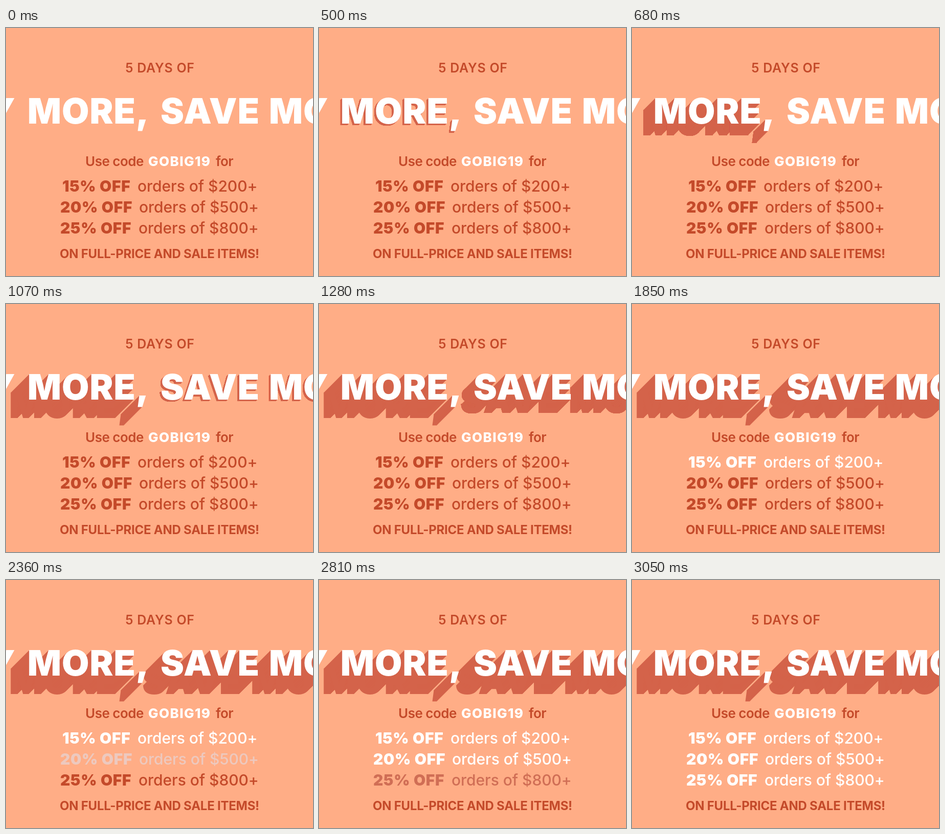
An HTML page that plays this animation: 600x485 px, repeating every 4.2 s.

```html
<!DOCTYPE html>
<html lang="en">
<head>
<meta charset="utf-8">
<style>
  html, body { margin: 0; height: 100%; overflow: hidden; background: #ffad86; }
  svg { display: block; font-family: Inter, Roboto, sans-serif; fill: #c44a2a; }
  .head { font-size: 69px; font-weight: 900; letter-spacing: 1px; fill: #fff; }
  .shade { fill: #d4634a; }
  .top { font-size: 25px; font-weight: 600; letter-spacing: .7px; }
  .use { font-size: 26px; font-weight: 600; letter-spacing: -.5px; }
  .code { font-weight: 800; fill: #fff; letter-spacing: 1.4px; }
  .offer { font-size: 30px; font-weight: 500; letter-spacing: -.05px; }
  .off { font-weight: 900; letter-spacing: .7px; }
  .foot { font-size: 24px; font-weight: 700; letter-spacing: -.25px; }
</style>
</head>
<body>
<svg width="600" height="485" viewBox="0 0 600 485">
  <defs>
    <g id="buy">
      <text x="19" y="187" text-anchor="end">BUY</text>
      <text x="42" y="187">MORE,</text>
    </g>
    <g id="save">
      <text x="302" y="187">SAVE</text>
      <text x="514" y="187">MORE</text>
    </g>
  </defs>
  <text class="top" x="301" y="87" text-anchor="middle">5 DAYS OF</text>
  <g class="head">
    <g class="shade" id="shades"></g>
    <use href="#buy"/>
    <use href="#save"/>
  </g>
  <g class="use">
    <text x="155" y="270">Use code</text>
    <text class="code" x="278" y="270">GOBIG19</text>
    <text x="410" y="270">for</text>
  </g>
  <g class="offer"><text class="off" x="110" y="320">15% OFF</text><text x="257" y="320">orders of $200+</text></g>
  <g class="offer"><text class="off" x="106" y="361">20% OFF</text><text x="260" y="361">orders of $500+</text></g>
  <g class="offer"><text class="off" x="106" y="402">25% OFF</text><text x="259" y="402">orders of $800+</text></g>
  <text class="foot" x="300" y="450" text-anchor="middle">ON FULL-PRICE AND SALE ITEMS!</text>
</svg>
<script>
const LOOP = 4200, TICK = 30, DEPTH = 36;
const shades = document.getElementById('shades');
const offers = [...document.querySelectorAll('.offer')];

// Stack of copies that extrudes a word towards the lower left
function extrusion(id) {
  return Array.from({ length: DEPTH }, () => {
    const copy = document.createElementNS('http://www.w3.org/2000/svg', 'use');
    copy.setAttribute('href', '#' + id);
    return shades.appendChild(copy);
  });
}
const words = [
  { copies: extrusion('buy'), start: 500 },
  { copies: extrusion('save'), start: 1070 }
];
const offerStarts = [1580, 2180, 2780];

// Progress 0..1 in equal steps, the first one taken at the start time
const progress = (t, start, steps) =>
  Math.max(0, Math.min(steps, Math.floor((t - start) / TICK) + 1)) / steps;

function draw(now) {
  const t = now % LOOP;
  for (const { copies, start } of words) {
    const depth = DEPTH * progress(t, start, 11);
    copies.forEach((copy, i) => {
      const d = Math.min(i + 1, depth);
      copy.setAttribute('transform', `translate(${-d} ${d})`);
      copy.setAttribute('visibility', depth ? 'visible' : 'hidden');
    });
  }
  offers.forEach((offer, i) => {
    const white = 100 * progress(t, offerStarts[i], 10);
    offer.style.fill = `color-mix(in srgb, #fff ${white}%, #c44a2a)`;
  });
  requestAnimationFrame(draw);
}
draw(performance.now());
</script>
</body>
</html>
```
